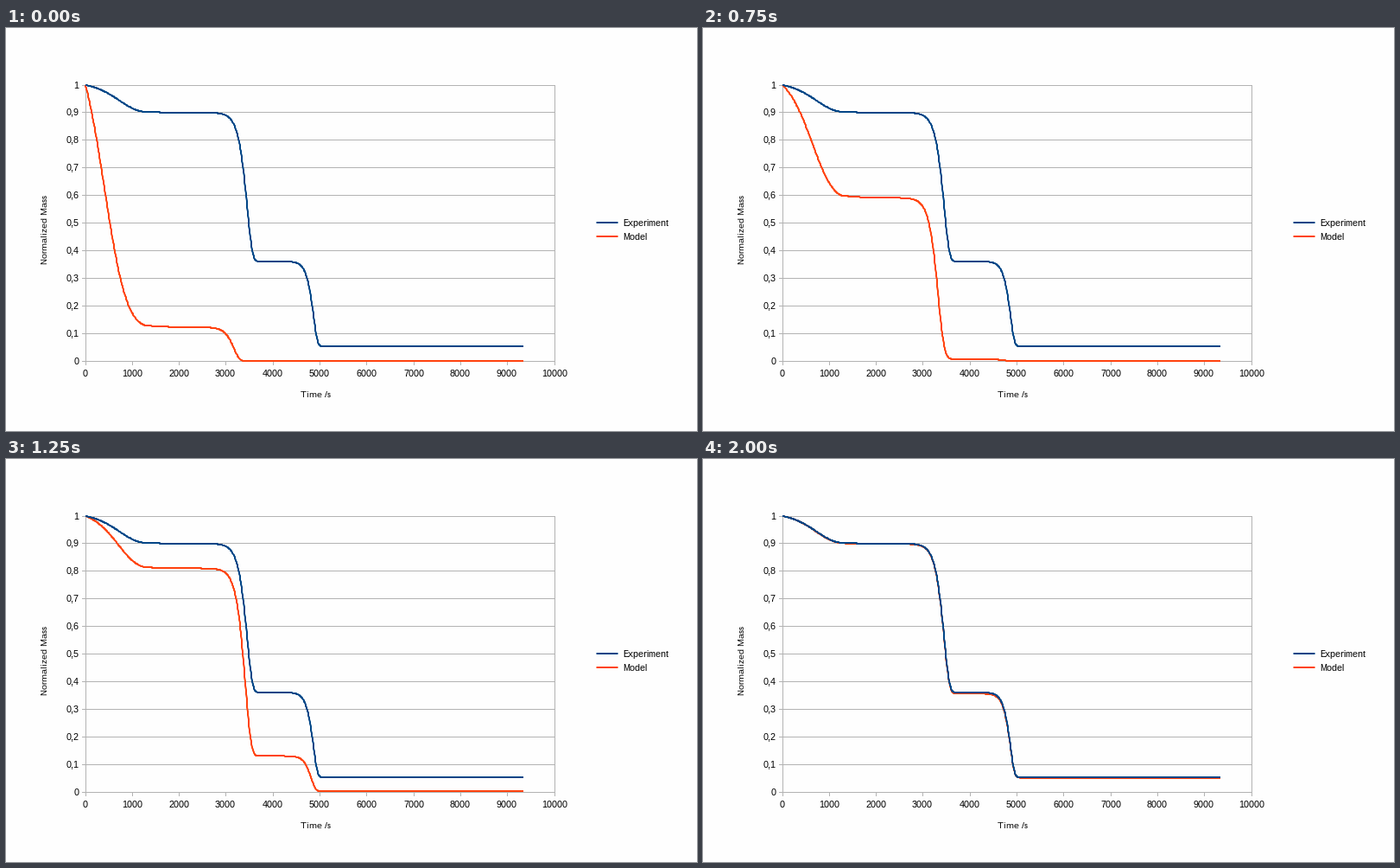
Recreate the animation shown at these times as a matplotlib script. Size 800 px wide and 466 px high, loop 2.25 s.

```python
import numpy as np
import matplotlib.pyplot as plt
from matplotlib.animation import FuncAnimation

WIDTH, HEIGHT, DPI = 800, 466, 100
PX = 72 / DPI  # points per pixel
LEFT, RIGHT, TOP, BOTTOM = 92, 635, 66, 385
BLUE, ORANGE, GRAY = "#004586", "#ff420e", "#b3b3b3"

# Reaction-rate factor of the model, one per frame
RATES = [20, 15, 10, 5, 4, 2, 1.5, 1.1, 1.012]

plt.rcParams["font.family"] = "Liberation Sans"
plt.rcParams["text.hinting"] = "native"
plt.rcParams["text.hinting_factor"] = 1

fig = plt.figure(figsize=(WIDTH / DPI, HEIGHT / DPI), dpi=DPI, facecolor="#fefefe")
ax = fig.add_axes([0, 0, 1, 1])
ax.set_xlim(0, WIDTH)
ax.set_ylim(HEIGHT, 0)
ax.axis("off")


def to_x(seconds):
    return LEFT + (RIGHT - LEFT) * seconds / 10000


def to_y(mass):
    return BOTTOM - (BOTTOM - TOP) * mass


def stroke(x, y, color, width, zorder):
    return ax.plot(x, y, color=color, lw=width * PX, solid_capstyle="butt",
                   solid_joinstyle="round", snap=False, zorder=zorder)[0]


def rule(x0, y0, x1, y1):
    stroke([x0, x1], [y0, y1], GRAY, 1, 1)


def label(x, y, text, size=10.67, **style):
    style.setdefault("va", "baseline")
    ax.text(x, y, text, fontsize=size * PX, color="black", **style)


def remaining(t, center, width):
    """Share left of a reaction that speeds up until it runs out."""
    return np.exp(-np.exp((t - center) / width))


def measured_mass(t):
    first = np.exp(-0.00032 * t * np.exp(np.minimum(t, 1250) / 570))
    late = np.minimum(t, 6000)
    return (0.0535 + 0.0998 * first
            + 0.5392 * remaining(late, 3448, 114)
            + 0.3075 * remaining(late, 4860, 90))


# Grid, axes and tick labels
for i in range(11):
    row = int(TOP + 31.9 * (10 - i) + 1e-6) + 0.5
    rule(LEFT - 4, row, RIGHT + 1, row)
    text = "1" if i == 10 else f"0,{i}" if i else "0"
    label(84.5, row + 3.5, text, ha="right")

    column = int(to_x(1000 * i)) + 0.5
    rule(column, BOTTOM, column, BOTTOM + 5)
    label(column - 0.5, 403, str(1000 * i), ha="center")
rule(LEFT + 0.5, TOP, LEFT + 0.5, BOTTOM + 1)
rule(RIGHT + 0.5, TOP, RIGHT + 0.5, BOTTOM + 1)

label(358.5, 427, "Time /s", 9.9, ha="center")
label(46, 233, "Normalized Mass", 9.9, rotation=90, ha="center", va="center")

# Legend
for y, name, color in [(225, "Experiment", BLUE), (241, "Model", ORANGE)]:
    stroke([683.5, 708.5], [y, y], color, 2, 2)
    label(714, y + 4, name)

# Curve points sit on whole pixels
seconds = np.linspace(0, 9340, 1200)
mass = measured_mass(seconds)
columns = np.round(to_x(seconds))
stroke(columns, np.round(to_y(mass)), BLUE, 2, 4)
model = stroke(columns, np.round(to_y(mass)), ORANGE, 2, 3)


def update(frame):
    model.set_ydata(np.round(to_y(mass ** RATES[frame])))
    return [model]


anim = FuncAnimation(fig, update, frames=len(RATES), interval=250,
                     repeat=True, repeat_delay=0, blit=False)
plt.show()
```
